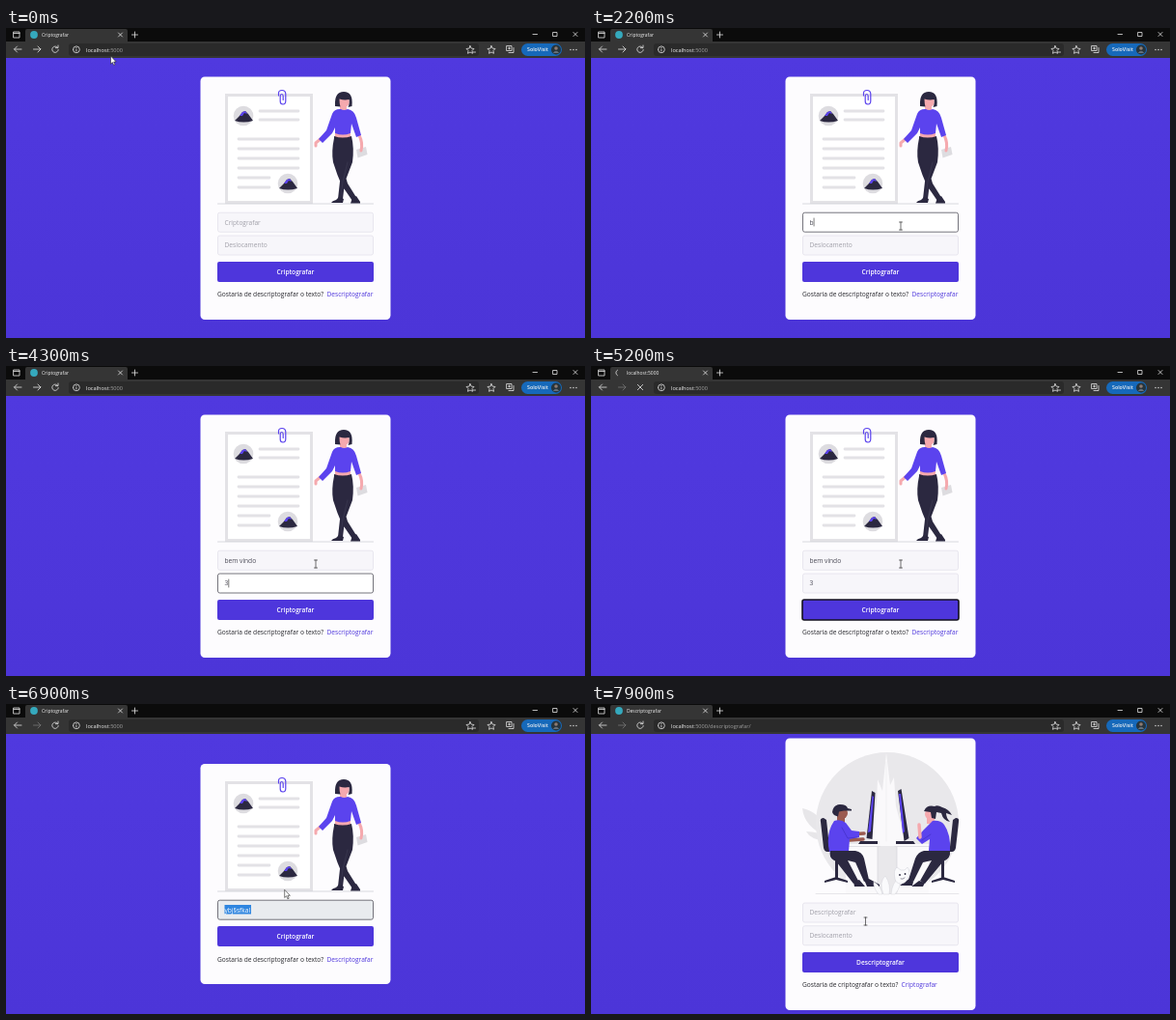
An HTML page that plays this animation: 600 px wide and 321 px high, repeating every 8 s.

```html
<!DOCTYPE html>
<html lang="pt">
<head>
<meta charset="utf-8">
<title>Criptografar</title>
<style>
  html, body { margin: 0; width: 100%; height: 100%; overflow: hidden; background: #4e37dc; }
  svg { display: block; width: 100vw; height: 100vh; font-family: "Open Sans", "Noto Sans", sans-serif; }
  text { white-space: pre; }
  .icon { fill: none; stroke: #e4e4e4; stroke-width: .8; stroke-linecap: round; stroke-linejoin: round; }
  .ui { font-size: 4.95px; fill: #f2f2f2; }
  .body { font-size: 6.6px; fill: #26262b; }
  .label { font-size: 6.6px; font-weight: 600; fill: #fff; text-anchor: middle; }
</style>
</head>
<body>
<svg id="stage" viewBox="0 0 600 321" preserveAspectRatio="none"></svg>
<script>
const LOOP = 8000;
const VIOLET = '#5b43ee', DARK = '#2b2840', SKIN = '#f5a9ae', GREY = '#e3e2e6', BROWN = '#9a5a50';

const path = (d, fill, extra = '') => `<path d="${d}" fill="${fill}" ${extra}/>`;
const line = (d, color, width, extra = '') =>
  `<path d="${d}" fill="none" stroke="${color}" stroke-width="${width}" stroke-linecap="round" stroke-linejoin="round" ${extra}/>`;
const rect = (x, y, w, h, fill, r = 0, extra = '') =>
  `<rect x="${x}" y="${y}" width="${w}" height="${h}" rx="${r}" fill="${fill}" ${extra}/>`;
const circle = (x, y, r, fill) => `<circle cx="${x}" cy="${y}" r="${r}" fill="${fill}"/>`;
const text = (x, y, cls, str, extra = '') => `<text x="${x}" y="${y}" class="${cls}" ${extra}>${str}</text>`;
const icon = (d, id = '') => `<path class="icon" d="${d}" ${id && `id="${id}"`}/>`;
const star = (x, y) => icon(`M${x} ${y - 4}l1.2 2.6 2.8.4-2 2 .5 2.8-2.5-1.3-2.5 1.3.5-2.8-2-2 2.8-.4z`);

function browser() {
  return rect(0, 0, 600, 14, '#0b0b0b') + rect(0, 14, 600, 17, '#353535') +
    path('M20 14V3q0-2 2-2H124q2 0 2 2V14z', '#353535') +
    rect(65, 16, 425, 13, '#2a2a2a', 3) +
    icon('M8 4h6v6h-6zM8 5.5h6') + circle(29, 7, 3.9, '#35a9bd').replace('<circle', '<circle id="dot"') +
    path('M26 3h4l2 2v6h-6z', 'none', 'id="doc" stroke="#eee" stroke-width=".8"') +
    line('M27.5 4.2A3.2 3.2 0 0 0 27.5 9.8', '#ddd', .8, 'id="spinner"') +
    text(37, 9, 'ui', '', 'id="title"') +
    icon('M116.5 5l4 4m0-4l-4 4M130.5 7h6m-3-3v6') +
    icon('M546 6.5h4.5M567 4.5h4v4h-4zM588 4.5l4 4m0-4l-4 4') +
    icon('M16 22H8.5l3-3m-3 3l3 3') + icon('M28.500 22h7.500l-3-3m3 3l-3 3', 'forward') +
    icon('M53.6 20.3A3.200 3.200 0 1 0 54.200 22.500M54 18v2.600h-2.600', 'reload') +
    icon('M48.300 19.300l5.400 5.400m0-5.400l-5.400 5.400', 'stop') +
    icon('M69.500 22.300a3.400 3.400 0 1 0 6.800 0a3.400 3.400 0 1 0-6.800 0M72.900 22v2m0-3.600v.1') +
    `<text x="83" y="24.500" font-size="5.650" fill="#f2f2f2">localhost<tspan fill="#a0a0a0" id="url"></tspan></text>` +
    star(481, 22.500) + icon('M484 25h2.500') + star(503, 22.500) +
    icon('M519 18.500h5v5h-5zM521 25.500h5v-5M520.500 21h2m-1-1v2') +
    rect(534, 16, 42, 13, '#1669ba', 6.500) +
    text(540, 24.400, 'ui', 'SoloVisit', 'style="font-size:5.300px;font-weight:600"') +
    circle(570, 22.500, 5, '#26343c') + circle(570, 21, 1.800, '#8d7a70') + path('M566.800 26q3.200-4.500 6.400 0z', '#65707a') +
    [585, 588, 591].map(x => circle(x, 22.500, .7, '#e4e4e4')).join('');
}

function badge(x, y) {
  return circle(x, y, 10.300, '#dddce0') +
    path(`M${x - 9} ${y + 5}l5-5 3-4 3-1 3 3 5 7q-10 3-19 0z`, DARK) +
    path(`M${x - 4} ${y}l3-4 3-1 2 3-3-1-2 3z`, VIOLET);
}

function paperScene() {
  const rows = [[262, 304, 86], [262, 304, 95], ...[115, 125, 135, 145].map(y => [240, 304, y]), [240, 274, 155], [240, 274, 165]];
  return rect(228.500, 69.500, 88, 111, '#fff', 0, `stroke="${GREY}" stroke-width="3"`) +
    rows.map(([a, b, y]) => line(`M${a + 1} ${y}H${b - 1}`, GREY, 2.800)).join('') +
    badge(246, 91) + badge(292, 161) +
    line('M282.500 70v-2.500q0-3 3.500-3t3.800 3.500v7.500q0 3.500-2.800 3.500t-2.800-3v-5.500q0-2 1.500-2t1.500 2v4', VIOLET, 1.200) +
    line('M219.500 182H380.500', '#cfced6', .8) +
    path('M363 126l10-3 1.500 8-10 3.500z', '#dddce0') +
    line('M366 111Q370 119 368 127', SKIN, 3) + line('M327 114l-6 5v3', SKIN, 3) +
    path('M346 79h7v8h-7z', SKIN) + path('M341 106h16v9h-16z', SKIN) +
    path('M346 84Q340 84 338 89L332 106 324 115l4 4 10-10 3-6v6q8 3 16 0l1-10 5 14 5-2-5-18q-2-8-9-9q-4 2-7 0z', VIOLET) +
    path('M340 112q9 3 18 0q3 12 1 27L351 160l-2 17h-5l2-18 4-24-1 9 5 17 10 16-5 2-11-16q-5-11-9-24q-2-11 1-25z', DARK) +
    line('M354 139l-5 20-2 17', '#45425b', .5) +
    path('M345 175l5 2-1 4h-12q1-2 5-3zM359 176l4-2 4 6v1.500h-10z', DARK) +
    circle(350, 76.500, 5.800, SKIN) +
    path('M341 81Q340 66 350 66T358.500 81l-4 1q2-5 1-8-5 1-10-.500 0 5 1 8z', DARK);
}

function deskScene() {
  const chair = 'M238 122q-1-4 3-4l3 2 3 28h18l2 5h-22q-3 0-4-4zM253 153h3v28h-3zM242 183l12-4 12 4v2l-12-3-12 3z';
  return path('M245 137Q221 128 219 108Q235 111 245 130zM243 142q-16-2-20-10q13 0 20 6z', '#e7e6e9') +
    `<clipPath id="disc"><path d="M233 50H381V197H233z"/></clipPath><g clip-path="url(#disc)">` +
    circle(307, 124, 74, '#e9e8eb') +
    path('M306 51l4 33 4-8 2 30 6 22 4 19h-38l4-22 4-23 1-24 5 12z', '#faf9fb') +
    line('M306 60v82', '#ecebee', .6) +
    path('M250 145h49v3h-49zM315 145h42v3h-42zM264 148h33v49h-33zM317 148h33v49h-33z', '#faf9fb') +
    line('M263 147.500H299M315 147.500H351M297 148V195M317 148V195', '#d6d5dc', .7) + '</g>' +
    line('M233 196.500H381', '#dedde3', .7) +
    path(chair, DARK) + path(chair, DARK, 'transform="translate(619 0) scale(-1 1)"') +
    path('M291 90l3.500 2-3 48-6-1z', DARK) + path('M291.500 95l1.500 1-3 36-3 1z', VIOLET) +
    path('M318 90l3.500-2 8 51-5 3z', DARK) + path('M321 93l4 39-2 2-4-41z', VIOLET) +
    path('M279 142h18v3h-20zM316 142h18l2 3h-20z', DARK) +
    // seated man
    path('M255 113h8v11h-8z', BROWN) + circle(260, 113, 6, BROWN) +
    path('M250 112q1-8 8-8 7 0 8 4l4 1v1.500h-8l-5 1-1 5q-5-1-6-4.500z', DARK) +
    line('M268 135l15-1', BROWN, 3.500) + line('M268 141l14-1', BROWN, 3.500) +
    path('M252 121q7-2 12 2l6 8 8 1v6l-10 2-1 13h-20q-4-19 5-32z', VIOLET) +
    line('M260 128l6 11 10-1', '#4330c4', .7) +
    path('M248 152h26q7 1 9 8l5 22-5 2-9-20-8-2 11 21-5 3-18-23q-8-3-6-11z', DARK) +
    path('M272 184l6-2 6 7h-11zM283 182l5-1 11 6v2h-13z', DARK) +
    // seated woman
    path('M348 112h8v12h-8z', SKIN) + circle(351.500, 114, 5.500, SKIN) +
    path('M345 111q3-7 11-5q3-2 8 1q7 2 10 8l-6-2q0 5 4 9q-7-1-9-9l-5-1-1 7-4-1-1-6z', DARK) +
    path('M354 121q8-1 12 4q7 10 6 27h-22l1-12-8 5-6-6 8-9z', VIOLET) +
    line('M341 138l-1-13', SKIN, 3.500) + line('M352 135l-9 6', '#4330c4', .7) +
    path('M372 152h-27q-6 1-9 8l-7 22 5 2 10-20 9-2-12 21 5 3 19-23q8-3 7-11z', DARK) +
    path('M340 183l6 2-2 4h-12zM330 181l4 3-1 4h-13q4-4 10-7z', DARK) +
    // plant and pet
    path('M303 197q-5-13 2-19 6 9 4 19zM311 197q1-13 9-17 2 9-5 17zM298 197q-6-7-5-13 7 4 9 13z', '#fafafc', 'stroke="#d5d4da" stroke-width=".5"') +
    path('M315 181q-2-9 2-12l4 3h4l3-3q4 6 0 12-2 5-7 5t-6-5z', '#fafafc', 'stroke="#cfced6" stroke-width=".5"') +
    circle(320, 177, .9, DARK) + circle(325.500, 176, .9, DARK) + line('M321 181q2 1 4-1', DARK, .5);
}

const card = (y, h) => rect(201.500, y, 197, h, '#fdfcfe', 4.500);
const field = (y, id) => rect(219.500, y, 161, 20, '#f7f6fa', 2, `id="${id}Box" stroke-width=".9"`) +
  text(226.500, y + 12.300, 'body', '', `id="${id}"`);
const button = (y, label, id = '') => rect(219, y, 162, 21, '#4e36dc', 2, id && `id="${id}"`) + text(300, y + 12.800, 'label', label);
const prompt = (y, verb, link, linkX) => text(219, y, 'body', `Gostaria de ${verb} o texto?`) +
  text(linkX, y, 'body', link, 'style="fill:#4e36dc"');

const pages = [
  card(50.500, 251.500) + paperScene() + field(191.200, 'message') + field(215, 'shift') +
    button(242, 'Criptografar', 'submit') + prompt(278, 'descriptografar', 'Descriptografar', 332.500),
  card(62, 228) + `<g transform="translate(0 12)">${paperScene()}</g>` + field(203.200, 'result') +
    rect(226.500, 208, 27.500, 9.500, '#2f86e0', 0, 'id="selection"') + '<use href="#result"/>' +
    button(230, 'Criptografar') + prompt(266.500, 'descriptografar', 'Descriptografar', 332.500),
  card(35.500, 281.500) + deskScene() + field(206, 'cipher') + field(229.800, 'cipherShift') +
    button(257, 'Descriptografar') + prompt(293.300, 'criptografar', 'Criptografar', 321.500)
];

const pointers = {
  arrow: path('M0 0V8.200l1.900-1.700 1.300 3 1.300-.6-1.300-2.900h2.500z', '#fff', 'stroke="#222" stroke-width=".6"'),
  beam: line('M-1.500-4H1.500M0-4V4M-1.500 4H1.500', '#333', .7),
  hand: path('M-1-3q1-1.200 2 0v3.500l3 1v3L3 7.500H-1L-3 3.500q0-1.500 1 0h1z', '#fff', 'stroke="#222" stroke-width=".6"')
};

document.getElementById('stage').innerHTML =
  `<linearGradient id="sky" x2="0" y2="1"><stop stop-color="#5039df"/><stop offset="1" stop-color="#4c35d8"/></linearGradient>` +
  rect(0, 30, 600, 291, 'url(#sky)') + pages.map((p, i) => `<g id="page${i}">${p}</g>`).join('') +
  line('M0 0V8', '#222', .6, 'id="caret"') + browser() +
  Object.entries(pointers).map(([k, p]) => `<g id="${k}">${p}</g>`).join('');

const $ = id => document.getElementById(id);
const show = (id, on) => $(id).setAttribute('display', on ? 'inline' : 'none');
const set = (id, attrs) => Object.entries(attrs).forEach(([k, v]) => $(id).setAttribute(k, v));

function setField(id, value, hint, focused, readonly) {
  if ($(id).textContent !== (value || hint)) $(id).textContent = value || hint;
  $(id).style.fill = value ? '#4a4955' : '#a09fa8';
  set(id + 'Box', {
    fill: readonly ? '#e9ecef' : focused ? '#fff' : '#f7f6fa',
    stroke: focused ? '#66656e' : '#e6e4ec'
  });
}

// time, x, y, pointer used from that time on
const track = [
  [0, 108.500, 29, 'arrow'], [100, 108.500, 29, 'arrow'], [900, 298.700, 176, 'arrow'], [1200, 298.700, 176, 'arrow'],
  [1500, 312, 193, 'beam'], [1800, 321, 205, 'beam'], [5550, 321, 205, 'beam'], [5900, 240, 213, 'beam'],
  [6200, 240, 213, 'beam'], [6350, 262, 202, 'arrow'], [6500, 284, 186, 'arrow'], [6850, 284, 186, 'arrow'],
  [7150, 345, 268, 'hand'], [7600, 345, 269, 'hand'], [7700, 318, 250, 'arrow'], [7800, 284.500, 225, 'beam'], [LOOP, 284.500, 225, 'beam']
];

function movePointer(t) {
  const i = track.findIndex((k, n) => n && t < k[0]) - 1;
  const [a, b] = [track[i], track[i + 1]];
  const p = (t - a[0]) / (b[0] - a[0]);
  const e = p * p * (3 - 2 * p);
  for (const kind in pointers) show(kind, kind === a[3]);
  set(a[3], { transform: `translate(${a[1] + (b[1] - a[1]) * e} ${a[2] + (b[2] - a[2]) * e})` });
}

function render(t) {
  const page = t < 5350 ? 0 : t < 7400 ? 1 : 2;
  const loading = t >= 4800 && page === 0;
  const focus = t < 1900 ? '' : t < 3700 ? 'message' : t < 4500 ? 'shift' : page === 0 ? 'submit' :
    t >= 6100 && t < 7200 ? 'result' : '';
  const selected = focus === 'result' && t >= 6250;

  pages.forEach((_, i) => show('page' + i, i === page));
  $('title').textContent = loading ? 'localhost:5000' : page === 2 ? 'Descriptografar' : 'Criptografar';
  $('url').textContent = ':5000' + (page === 2 ? '/descriptografar/' : '');
  const doc = page === 2 && t < 7750;
  show('spinner', loading);
  set('spinner', { transform: `rotate(${(t - 5200) * .36} 29 7)` });
  show('doc', doc);
  show('dot', !loading && !doc);
  show('stop', loading);
  show('reload', !loading);
  $('forward').style.stroke = t < 4800 ? '#e4e4e4' : '#777';

  const typed = 'bem vindo'.slice(0, Math.max(0, Math.floor((t - 2100) / 140) + 1));
  setField('message', typed, 'Criptografar', focus === 'message');
  setField('shift', t >= 4100 ? '3' : '', 'Deslocamento', focus === 'shift');
  setField('result', 'ybj§sfkal', '', focus === 'result', true);
  setField('cipher', '', 'Descriptografar');
  setField('cipherShift', '', 'Deslocamento');
  if (selected) $('result').style.fill = '#fff';
  show('selection', selected);
  set('submit', { stroke: focus === 'submit' ? '#14121f' : 'none', 'stroke-width': 1.600 });

  const editing = focus === 'message' || focus === 'shift';
  show('caret', editing && (t - 1900) % 1000 < 600);
  if (editing) {
    const empty = focus === 'message' ? !typed : t < 4100;
    const x = 226.700 + (empty ? 0 : $(focus).getComputedTextLength() + .3);
    set('caret', { transform: `translate(${x} ${focus === 'message' ? 197 : 221})` });
  }
  movePointer(t);
}

const start = performance.now();
function tick() {
  render((performance.now() - start) % LOOP);
  requestAnimationFrame(tick);
}
tick();
</script>
</body>
</html>
```
